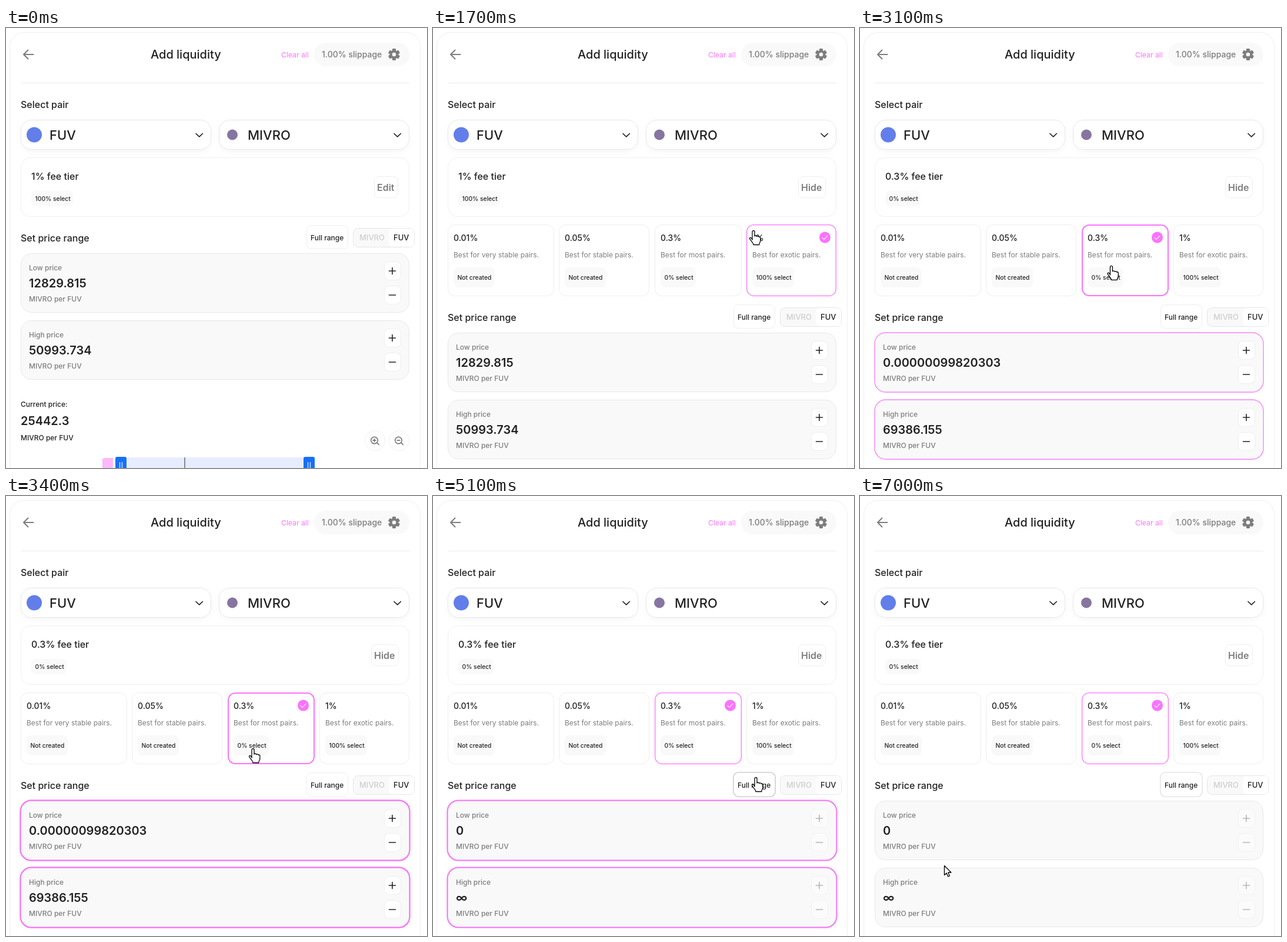
An HTML page that plays this animation: 716 by 748 pixels, repeating every 7100 ms.

```html
<!DOCTYPE html>
<html lang="en">
<head>
<meta charset="utf-8">
<title>Add liquidity</title>
<style>
  html, body { margin: 0; width: 100%; height: 100%; overflow: hidden; background: #fff; }
  svg { display: block; width: 716px; height: 748px; }
  text { font-family: Inter, "Liberation Sans", sans-serif; white-space: pre; }
</style>
</head>
<body>
<svg id="stage" viewBox="0 0 716 748">
  <defs>
    <filter id="soft" x="-10%" y="-30%" width="120%" height="170%">
      <feDropShadow dx="0" dy="3" stdDeviation="4" flood-color="#000" flood-opacity=".035"/>
    </filter>
  </defs>
  <g id="fixed"></g>
  <g id="tier"></g>
  <g id="range"></g>
  <g id="pointer"></g>
</svg>
<script>
const LOOP = 7100, STEP = 100;
const INK = '#222', GREY = '#7d7d7d', PINK = '#fc72ff', LINE = '#ececec', PALE = '#f9f9f9';
const BASE = 'FUV', QUOTE = 'MIVRO', UNIT = `${QUOTE} per ${BASE}`;
const OPEN = 1200, PICK = 2700, PRICED = 2900, FULL = 4700;
const PULSES = [2900, 4650], PULSE_MS = 800;

const layer = id => document.getElementById(id);

// Text is centred on y by its capital height.
const text = (x, y, size, str, fill = INK, weight = 500, extra = '') =>
  `<text x="${x}" y="${y + size * .364}" font-size="${size}" fill="${fill}" font-weight="${weight}" ${extra}>${str}</text>`;

// Box given by its outer edges, with the border drawn inside.
const box = (x1, y1, x2, y2, r, fill = '#fff', stroke = LINE, w = 1, extra = '') => {
  const h = stroke === 'none' ? 0 : w / 2;
  return `<rect x="${x1 + h}" y="${y1 + h}" width="${x2 - x1 - 2 * h}" height="${y2 - y1 - 2 * h}" rx="${r}" fill="${fill}" stroke="${stroke}" stroke-width="${w}" ${extra}/>`;
};

const stroke = (d, color, w, extra = '') =>
  `<path d="${d}" fill="none" stroke="${color}" stroke-width="${w}" stroke-linecap="round" stroke-linejoin="round" ${extra}/>`;

const badge = (x, y1, y2, str, w) =>
  box(x, y1, x + w, y2, 8, PALE, 'none') + text(x + 6.5, (y1 + y2) / 2, 10.3, str, INK, 500);

function gear(cx, cy) {
  let teeth = '';
  for (let a = 0; a < 360; a += 60)
    teeth += `<rect x="-3" y="-10" width="6" height="8" rx="1.2" transform="rotate(${a})"/>`;
  return `<g transform="translate(${cx} ${cy})" fill="${GREY}">${teeth}<circle r="7.4"/><circle r="3.3" fill="${PALE}"/></g>`;
}

function picker(x, name, color, r, cx) {
  return box(x, 156, x + 324, 207, 18, '#fff', '#e7e7e7', 1, 'filter="url(#soft)"')
    + `<circle cx="${cx}" cy="181.5" r="${r}" fill="${color}"/>`
    + text(x + 49, 182, 22, name)
    + stroke(`M${x + 298} 179.5l5.7 5.4 5.7-5.4`, INK, 1.7);
}

function drawFixed() {
  return box(6, 7, 705, 800, 24, '#fff', '#efefef')
    + stroke('M46.5 45H30.5M37.5 37.5L30 45l7.5 7.5', GREY, 2)
    + text(246, 45, 20, 'Add liquidity')
    + text(468, 45.5, 12.2, 'Clear all', PINK, 400)
    + box(524, 25, 686, 65, 20, PALE, 'none')
    + text(537, 45, 14, '1.00% slippage', GREY)
    + gear(660, 45)
    + box(25, 93, 686, 94, 0, '#ebebeb', 'none')
    + text(25, 130, 16, 'Select pair')
    + picker(25, BASE, '#627eea', 13, 48)
    + picker(362, QUOTE, '#8575a0', 9, 385);
}

const TIERS = [
  [25, 206, '0.01%', 'very stable', 'Not created', 70],
  [214, 368, '0.05%', 'stable', 'Not created', 70],
  [377, 525, '0.3%', 'most', '0% select', 60],
  [533, 686, '1%', 'exotic', '100% select', 71],
];

function tierCard([x1, x2, rate, kind, share, w], on, hover) {
  const border = on ? box(x1, 334, x2, 456, 12, '#fff', PINK, hover ? 2 : 1.3)
                    : box(x1, 334, x2, 456, 12, '#fff', '#eee');
  const tick = on ? `<circle cx="${x2 - 19.5}" cy="356" r="9.5" fill="${PINK}"/>`
    + stroke(`M${x2 - 24} 356.4l3 3 6-6.2`, '#fff', 1.1) : '';
  return border + text(x1 + 10, 357, 14, rate)
    + text(x1 + 10, 385.5, 12, `Best for ${kind} pairs.`, GREY, 400)
    + badge(x1 + 10, 407, 441, share, w) + tick;
}

function drawTier(t) {
  const open = t >= OPEN, low = t >= PICK;
  const [, , rate, , share, w] = TIERS[low ? 2 : 3];
  const pressed = t >= 900 && t < 1100, hover = t >= 800 && t < 1500;
  const fill = pressed ? '#dcdcdc' : hover ? '#f0f0f0' : '#fff';
  const left = open ? 621 : 626;
  let out = box(25, 220, 686, 321, 16, '#fff', '#f0f0f0')
    + text(43, 252.5, 16, rate + ' fee tier')
    + badge(43, 277, 303, share, w)
    + box(left, 252, open ? 668 : 667, 289, 8, fill, pressed ? '#d0d0d0' : '#eee')
    + text(left + 5, 271, 16, open ? 'Hide' : 'Edit', GREY, 600);
  if (open) TIERS.forEach((row, i) => {
    out += tierCard(row, i === (low ? 2 : 3), i === 2 && t < 3500);
  });
  return out;
}

// Ring grows to 2px at 70% of the pulse, then shrinks.
function ringWidth(t) {
  for (const start of PULSES) {
    const p = (t - start) / PULSE_MS;
    if (p > 0 && p < 1) return 2 * (p < .7 ? p / .7 : (1 - p) / .3);
  }
  return 0;
}

function stepButton(y, plus, off) {
  const d = `M651.5 ${y}h11` + (plus ? `M657 ${y - 5.5}v11` : '');
  return box(643, y - 16, 672, y + 16, 8, off ? '#fbfbfb' : '#fff', off ? '#f2f2f2' : '#eee')
    + stroke(d, off ? '#b5b5b5' : INK, 1.6);
}

function priceBox(y, label, value, ring, off) {
  const halo = ring ? box(25 - ring, y - ring, 686 + ring, y + 101 + ring, 19, 'none', PINK, ring + .4) : '';
  return box(25, y, 686, y + 101, 18, PALE, '#e8e8e8') + halo
    + text(39, y + 24.5, 12, label, GREY)
    + text(39, y + 51, 20, value, INK, 600)
    + text(39, y + 77.5, 12, UNIT, GREY)
    + stepButton(y + 30, true, off) + stepButton(y + 71, false, off);
}

function zoomIcon(cx, plus) {
  const d = `M${cx + 3.7} 705.2l3.2 3.2M${cx - 3.6} 701h5.2` + (plus ? `M${cx - 1} 698.4v5.2` : '');
  return `<circle cx="${cx}" cy="701.5" r="17" fill="#fff" stroke="#f0f0f0"/>`
    + `<circle cx="${cx - 1}" cy="701" r="5.8" fill="none" stroke="#666" stroke-width="1.4"/>`
    + stroke(d, '#666', 1.4);
}

function chart() {
  const handle = x => `<path d="M${x} 760V732q0-3 3-3h13q3 0 3 3V760Z" fill="#1670f5"/>`
    + `<path d="M${x + 7.5} 738v20M${x + 11.5} 738v20" stroke="#cfe0ff" stroke-width="1.4"/>`;
  return '<path d="M164 760V732h3V731h15V760Z" fill="#fcb8fb"/>'
    + box(196, 730, 516, 760, 0, '#e7edfe', 'none')
    + box(303, 730, 305, 760, 0, '#858a96', 'none')
    + handle(186) + handle(506);
}

function fullButton(t) {
  const hover = t >= 3900 && t < 5600, used = t >= 5600;
  const g = hover || used ? 1 : 0;
  return box(511 - g, 335 - g, 582 + g, 376 + g, 8 + g, '#fff', hover ? '#cfcfcf' : used ? '#e6e6e6' : '#eee', hover || used ? 1.6 : 1)
    + text(518, 356.5, 12, 'Full range');
}

function drawRange(t) {
  const full = t >= FULL, priced = t >= PRICED, ring = ringWidth(t);
  const low = full ? '0' : priced ? '0.00000099820303' : '12829.815';
  const high = full ? '∞' : priced ? '69386.155' : '50993.734';
  return text(25, 357, 16, 'Set price range')
    + fullButton(t)
    + box(590, 340, 695, 373, 8, PALE, '#e6e6e6')
    + box(651, 341, 694, 372, 7, '#fff', 'none')
    + text(601, 356.5, 13, QUOTE, '#cecece')
    + text(659, 356.5, 13, BASE)
    + priceBox(383, 'Low price', low, ring, full)
    + priceBox(497, 'High price', high, ring, full)
    + text(25, 639.5, 12, 'Current price:')
    + text(25, 668, 20, '25442.3', INK, 600)
    + text(25, 696.5, 12, UNIT)
    + zoomIcon(627.5, true) + zoomIcon(668.5, false) + chart();
}

// time, x, y, shape until the next row
const PATH = [
  [0, 0, 0, ''], [100, 712, 470, 'arrow'], [500, 690, 360, 'arrow'], [800, 656, 280, 'hand'],
  [1000, 655, 277, 'hand'], [1300, 655, 277, 'hand'], [1500, 612, 305, 'arrow'], [1700, 545, 345, 'hand'],
  [2100, 439, 366, 'hand'], [2700, 439, 366, 'hand'], [3400, 420, 430, 'hand'], [3500, 430, 440, 'arrow'],
  [3900, 563, 486, 'hand'], [4700, 563, 486, 'hand'], [5000, 549, 479, 'hand'], [5500, 549, 479, 'arrow'],
  [6200, 480, 505, 'arrow'], [6500, 60, 550, 'arrow'], [6600, 0, 0, ''], [6800, 30, 738, 'arrow'],
  [7000, 143, 628, 'arrow'], [7100, 143, 628, ''],
];
const SHAPES = {
  arrow: 'M.5 .5V16.5L4.2 13 6.8 19 9.4 17.9 6.9 12H12Z',
  hand: 'M-2 15V1.5a2 2 0 0 1 4 0V9q0-1.2 1.8-1t2 1.6q0-1 1.8-.7t1.8 1.6q0-1 1.4-.4t1 2V17c0 2-2 3-2 6.5H0c0-3-5-7-6.4-10.5-.5-2 2-2.2 3.2-.5Z',
};

function drawPointer(t) {
  let i = PATH.length - 2;
  while (PATH[i][0] > t) i--;
  const [t0, x0, y0, shape] = PATH[i], [t1, x1, y1, next] = PATH[i + 1];
  if (!shape) return '';
  const p = next ? (t - t0) / (t1 - t0) : 0, e = p * p * (3 - 2 * p);
  return `<path transform="translate(${x0 + (x1 - x0) * e} ${y0 + (y1 - y0) * e})" d="${SHAPES[shape]}" fill="#fff" stroke="#000" stroke-width="1.3" stroke-linejoin="round"/>`;
}

function draw(t) {
  layer('tier').innerHTML = drawTier(t);
  layer('range').innerHTML = drawRange(t);
  layer('range').setAttribute('transform', `translate(0 ${t >= OPEN ? 135 : 0})`);
  layer('pointer').innerHTML = drawPointer(t);
}

layer('fixed').innerHTML = drawFixed();
const began = performance.now();
let shown = -1;
function tick() {
  const t = Math.floor((performance.now() - began) % LOOP / STEP) * STEP;
  if (t !== shown) draw(shown = t);
  requestAnimationFrame(tick);
}
tick();
</script>
</body>
</html>
```
